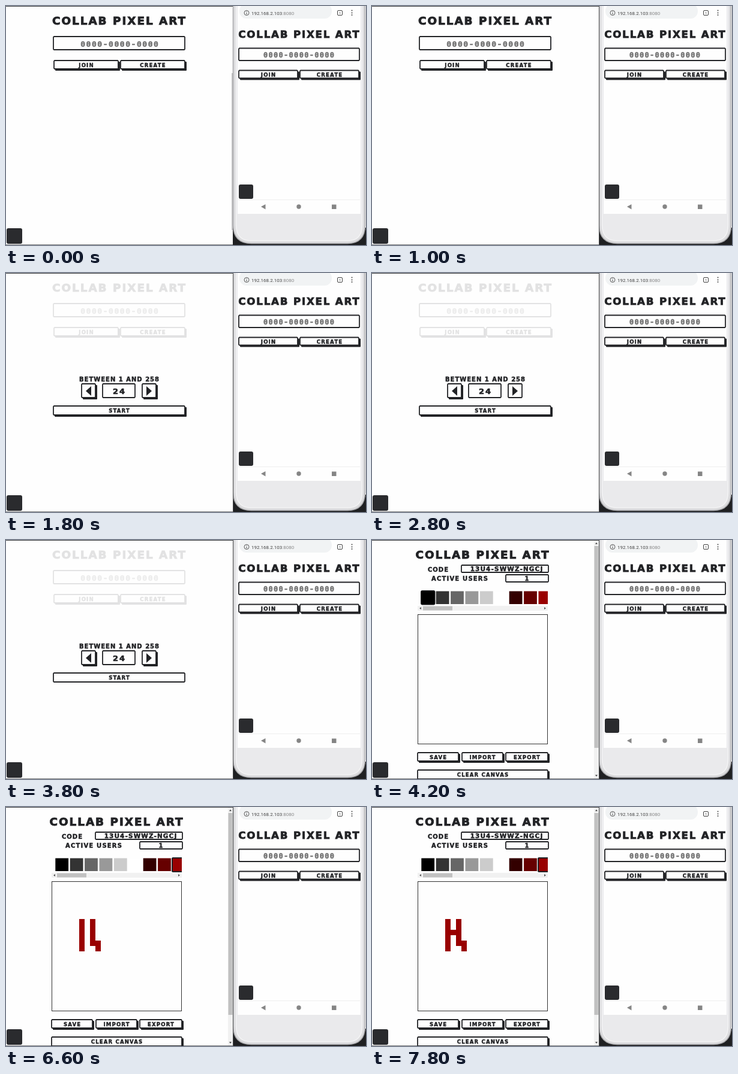
These frames come from a looping animation (600 by 399 pixels, 8000 ms). An HTML page:

```html
<!DOCTYPE html>
<html lang="en">
<head>
<meta charset="utf-8">
<title>Collab Pixel Art</title>
<style>
  html, body { margin: 0; width: 100%; height: 100%; overflow: hidden; background: #fefefe; }
  svg { display: block; width: 100%; height: 100%; }
  text {
    font-family: "DejaVu Sans", sans-serif; font-weight: bold; text-anchor: middle;
    fill: #222326; stroke: #222326; stroke-width: 0.05em; stroke-linejoin: miter;
  }
  .mono { font-family: "DejaVu Sans Mono", monospace; fill: #777; stroke: #777; }
  .url { font-family: Roboto, sans-serif; font-weight: normal; fill: #444; stroke: none; text-anchor: start; }
</style>
</head>
<body>
<svg id="stage" viewBox="0 0 600 399"></svg>
<script>
const INK = '#222326', PAPER = '#fefefe', RED = '#990000';
const LOOP = 8000, CELL = 9;

const rect = (x, y, w, h, fill, extra = '') =>
  `<rect x="${x}" y="${y}" width="${w}" height="${h}" fill="${fill}" ${extra}/>`;
const path = (d, fill, extra = '') => `<path d="${d}" fill="${fill}" ${extra}/>`;
// Centred text; half the spacing makes up for the gap after the last letter.
const label = (x, y, size, text, spacing = 0, cls = '') =>
  `<text x="${x + spacing / 2}" y="${y}" font-size="${size}" letter-spacing="${spacing}" class="${cls}">${text}</text>`;
const group = (id, ...parts) => `<g id="${id}">${parts.join('')}</g>`;

// Frame with a thick line and clipped corners.
const box = (x, y, w, h) => {
  const r = x + w, b = y + h;
  return path(`M${x + 2} ${y + 1}H${r - 2}L${r - 1} ${y + 2}V${b - 2}L${r - 2} ${b - 1}H${x + 2}L${x + 1} ${b - 2}V${y + 2}Z`,
    PAPER, `stroke="${INK}" stroke-width="1.8"`);
};
const raised = (id, x, y, w, h) =>
  rect(x + 3, y + 3, w - 1, h - 1, INK, `rx="1" id="${id}-shadow"`) + box(x, y, w, h);
const button = (id, x, y, w, h, text) =>
  raised(id, x, y, w, h) + label(x + w / 2, y + h / 2 + 3.6, 8.6, text, 1.15);

const title = (x, y, size) => label(x, y, size, 'COLLAB PIXEL ART', size * 0.107);

function home() {
  return group('home',
    title(188, 31.4, 18.4),
    box(78, 50, 221, 24),
    label(189, 67.5, 13, '0000-0000-0000', 1.55, 'mono'),
    button('join', 79, 90, 109, 16, 'JOIN'),
    button('create', 190, 90, 109, 16, 'CREATE'));
}

function sizeDialog() {
  return group('dialog',
    label(188.5, 180.5, 10, 'BETWEEN 1 AND 258', 1),
    raised('less', 125, 184, 25, 25),
    path('M133 197L142 189V205Z', INK),
    box(160, 184, 56, 25),
    label(188, 202, 13, '24', 2),
    raised('more', 226, 184, 25, 25),
    path('M243 197L234 189V205Z', INK),
    button('start', 78, 221, 221, 17, 'START'));
}

function editor() {
  const colors = ['#000', '#333', '#666', '#999', '#ccc', '#fff', '#330000', '#660000', RED];
  const swatches = colors.map((color, i) =>
    rect(82.3 + i * 24.4, 85.5, Math.min(21.8, 293 - 82.3 - i * 24.4), 21.5, color));
  return group('editor',
    title(183.5, 31.4, 18.4),
    label(110, 52.7, 10, 'CODE', 1),
    box(148, 41, 147, 14),
    label(224, 51.7, 10.5, '13U4-SWWZ-NGCJ', 1.1),
    label(146, 68, 10, 'ACTIVE USERS', 1.2),
    box(222, 57, 73, 14),
    label(258, 68, 10, '1'),
    ...swatches,
    rect(81.5, 84.5, 23.5, 23.5, '#000', `id="black" rx="2" stroke="${INK}"`),
    path('M293 85H278L277 86V107L278 108H293', RED, `id="red" stroke="${INK}" stroke-width="2"`),
    rect(76, 110, 217, 8, '#f1f1f1'),
    rect(85, 110.5, 49, 7, '#c1c1c1'),
    path('M79 114l3-2v4zM290 114l-3-2v4z', '#555'),
    rect(76.5, 124.5, 216, 216, PAPER, 'stroke="#333"'),
    '<path id="drawing"/>',
    button('save', 75, 354, 70, 16, 'SAVE'),
    button('import', 149, 354, 70, 16, 'IMPORT'),
    button('export', 222, 354, 72, 16, 'EXPORT'),
    button('clear', 75, 383, 219, 17, 'CLEAR CANVAS'),
    rect(370, 1, 8, 397, '#f1f1f1'),
    rect(370.5, 10, 7, 337, '#c1c1c1'),
    path('M374 4l2 3h-4zM374 395l2-3h-4z', '#555'));
}

function phone() {
  return group('phone',
    rect(378, 370, 222, 29, '#1f2022'),
    rect(376, 112, 2, 262, '#c4c4c6'),
    path('M378.5-2V366Q379 396.5 409 396.5H569Q598.5 396.5 598.5 366V-2Z', '#dcdcde', 'stroke="#a8a8ab" stroke-width="1.5"'),
    path('M383.5-2V366Q384 392 409 392H569Q593.5 392 593.5 366V-2Z', '#eaeaec', 'stroke="#f4f4f5" stroke-width="1.5"'),
    rect(386, 0, 205, 347, PAPER),
    rect(389, -4, 154, 25, '#f1f3f4', 'rx="12"'),
    '<circle cx="401" cy="11.5" r="4" fill="none" stroke="#555"/>',
    rect(400.5, 9, 1, 1, '#555'), rect(400.5, 11, 1, 3, '#555'),
    '<text class="url" x="409" y="14.5" font-size="8">192.168.2.103<tspan fill="#888">:8080</tspan></text>',
    rect(552.5, 7.5, 8, 8, 'none', 'stroke="#444" rx="1.5"'),
    '<text class="url" x="555" y="14" font-size="6">1</text>',
    ...[7.5, 11.5, 15].map(y => `<circle cx="576.5" cy="${y}" r="1" fill="#444"/>`),
    title(488, 53.4, 16.7),
    box(387, 69.5, 203, 22.5),
    label(488, 86, 12, '0000-0000-0000', 1.28, 'mono'),
    button('phone-join', 387, 106.5, 100, 15, 'JOIN'),
    button('phone-create', 489, 106.5, 100, 15, 'CREATE'),
    rect(388, 298, 24, 24, '#2a2b2e', 'rx="3"'),
    rect(387, 323, 203, 1, '#eee'),
    path('M425 335L432.5 331V339.5Z', '#858585'),
    '<circle cx="488" cy="335" r="3.7" fill="#858585"/>',
    rect(543, 331.5, 7.5, 7.5, '#858585'));
}

document.getElementById('stage').innerHTML =
  rect(0, 0, 600, 399, PAPER) + phone() + home() + sizeDialog() +
  rect(0, 0, 378, 1, '#38393b') + rect(0, 398, 378, 1, '#77787a') +
  group('window-edge', rect(376, 1, 2, 397, PAPER), rect(378, 0, 1, 399, '#4a4b4d')) +
  editor() + rect(1, 371, 26, 26, '#2a2b2e', 'rx="3"');

// Brush strokes: time, column, first row, number of cells.
const strokes = [
  [5400, 5, 7, 2], [5600, 5, 9, 2], [5800, 5, 11, 2],
  [6000, 7, 7, 2], [6200, 7, 9, 3], [6400, 8, 11, 2],
  [7000, 6, 9, 1],
];

const el = id => document.getElementById(id);
const show = (id, visible) => { el(id).style.display = visible ? '' : 'none'; };
const within = (t, from, to) => t >= from && t < to;
el('drawing').setAttribute('fill', RED);

function render(t) {
  const editing = t >= 4200;
  show('window-edge', t >= 200);
  show('home', !editing);
  el('home').style.opacity = t >= 1800 ? 0.12 : 1;
  show('dialog', within(t, 1800, 4200));
  show('editor', editing);

  // A button under the pointer loses its shadow.
  show('create-shadow', !within(t, 1400, 1800));
  show('more-shadow', !within(t, 2800, 3000));
  show('less-shadow', !within(t, 3200, 3600));
  show('start-shadow', t < 3800);

  show('black', t < 5000);
  show('red', t >= 5000);
  el('drawing').setAttribute('d', strokes
    .filter(([start]) => t >= start)
    .map(([, col, row, n]) => `M${77 + col * CELL} ${124 + row * CELL}h${CELL}v${n * CELL}h-${CELL}z`)
    .join(''));
}

const origin = performance.now();
function tick() {
  render((performance.now() - origin) % LOOP);
  requestAnimationFrame(tick);
}
tick();
</script>
</body>
</html>
```
